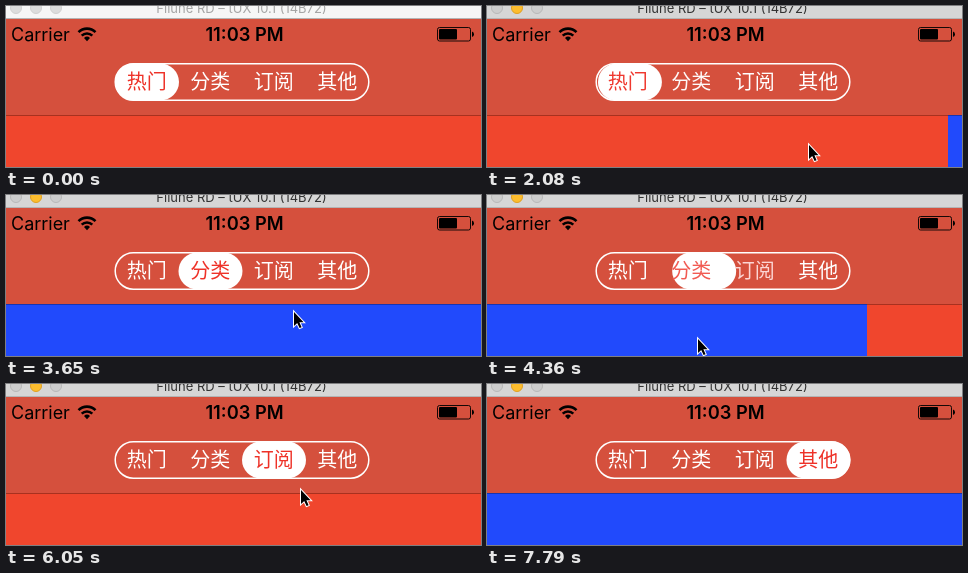
An HTML page that plays this animation: 475 px wide and 161 px high, repeating every 8 s.

```html
<!DOCTYPE html>
<html lang="zh-CN">
<head>
<meta charset="utf-8">
<style>
html, body { margin: 0; width: 100%; height: 100%; overflow: hidden; }
svg { display: block; width: 475px; height: 161px; }
text { font-family: Inter, Roboto, sans-serif; }
#tabs text { font: 20px "Noto Sans CJK SC", "Noto Sans CJK", sans-serif; text-anchor: middle; }
</style>
</head>
<body>
<svg viewBox="0 0 475 161">
  <g id="pages"></g>
  <rect y="12" width="475" height="97" fill="#d5503d"/>
  <rect y="109" width="475" height="1" fill="#000" opacity=".3"/>

  <rect id="bar" width="475" height="12"/>
  <rect y="12" width="475" height="1" fill="#b4b4b4"/>
  <g id="lights"></g>
  <text id="title" x="235.5" y="7" font-size="13" text-anchor="middle">Filune RD – tUX 10.1 (14B72)</text>

  <text x="5" y="35" font-size="18">Carrier</text>
  <text x="238.5" y="35" font-size="18.3" font-weight="600" text-anchor="middle">11:03 PM</text>
  <g fill="none" stroke="#000" stroke-width="2.6">
    <path d="M72.5 26.2a12 12 0 0 1 17 0M75.7 29.6a7.6 7.6 0 0 1 10.6 0"/>
    <path d="M81 35.2l-3-3.2a4.4 4.4 0 0 1 6 0z" fill="#000" stroke="none"/>
  </g>
  <rect x="431.5" y="21.5" width="33" height="13.5" rx="2" fill="none" stroke="#000" stroke-opacity=".9"/>
  <rect x="433" y="23" width="18" height="10.5" rx="1"/>
  <path d="M466 25.5q2 .6 2 2.7t-2 2.7z"/>

  <rect x="109.2" y="57.8" width="253.6" height="36.4" rx="18.2" fill="none" stroke="#fff" stroke-width="1.5"/>
  <rect id="pill" y="57.5" width="64" height="37" rx="18.5" fill="#fff"/>
  <g id="tabs"></g>

  <path id="cursor" d="M1 1V15L4.2 12L6.6 17L8.6 16.2L6.4 11.2H10.6Z" stroke="#fff" stroke-width="2" paint-order="stroke"/>
</svg>
<script>
const LOOP = 8000, WIDTH = 475, TAB = 63.5, LEFT = 109;
const RED = [240, 70, 45], BLUE = [33, 74, 252];
const WHITE = [255, 255, 255], INK = [238, 50, 40];
const $ = id => document.getElementById(id);
const rgb = c => `rgb(${c.map(Math.round)})`;
const mix = (a, b, u) => a.map((v, i) => v + (b[i] - v) * u);
const ramp = (t, a, b) => Math.min(1, Math.max(0, (t - a) / (b - a)));

function add(parent, tag, attrs, text = "") {
  const el = document.createElementNS("http://www.w3.org/2000/svg", tag);
  for (const k in attrs) el.setAttribute(k, attrs[k]);
  el.textContent = text;
  return parent.appendChild(el);
}

// The pointer glides to "from", drags the page to "to", then lets it snap
const swipes = [
  { glide: 540, press: 2032, stop: 2990, free: 3240, from: 335, to: 59, y: 138 },
  { glide: 3290, press: 4120, stop: 4695, free: 4940, from: 303, to: 80, y: 143 },
  { glide: 5760, press: 6790, stop: 7500, free: 7500, from: 344, to: 21, y: 123 }
];
// Finally it leaves the stage
swipes.push({ glide: 7560, press: LOOP, stop: LOOP + 1, free: LOOP, from: -60, to: -60, y: 123 });

function pose(t) {
  let x = 420, y = 146, page = 0;
  for (const s of swipes) {
    const u = ramp(t, s.glide, s.glide + 760);
    const ease = 1 - (1 - u) ** 2.3, arc = Math.sin(Math.PI * u);
    const drag = (s.from - s.to) * ramp(t, s.press, s.stop);
    const rest = Math.exp(-Math.max(0, t - s.free) / 50);
    x += (s.from - x) * ease + Math.sign(s.from - x) * 40 * arc - drag;
    y += (s.y - y) * ease - 26 * arc;
    page += 1 - (1 - drag / 468) * rest;
  }
  return { x, y, page };
}

[RED, BLUE, RED, BLUE].forEach((c, i) =>
  add($("pages"), "rect", { x: i * WIDTH, y: 109, width: WIDTH, height: 52, fill: rgb(c) }));
const labels = ["热门", "分类", "订阅", "其他"].map((s, i) =>
  add($("tabs"), "text", { x: LEFT + TAB * (i + .5), y: 83 }, s));
const lights = [10, 30, 50].map(cx => add($("lights"), "circle", { cx, cy: 2, r: 5.5 }));

function draw(now) {
  const t = now % LOOP, active = t >= 2030;
  const { x, y, page } = pose(t);

  $("pages").setAttribute("transform", `translate(${-Math.round(page * WIDTH)})`);
  $("pill").setAttribute("x", LEFT + page * TAB);
  labels.forEach((el, i) =>
    el.setAttribute("fill", rgb(mix(WHITE, INK, Math.max(0, 1 - Math.abs(page - i))))));

  $("bar").setAttribute("fill", active ? "#d6d6d6" : "#f6f6f6");
  $("title").setAttribute("fill", active ? "#333" : "#a5a5a5");
  lights.forEach((el, i) => {
    const on = active && i === 1;
    el.setAttribute("fill", on ? "#fdbd2e" : active ? "#cdcdcd" : "#dcdcdc");
    el.setAttribute("stroke", on ? "#dfa023" : active ? "#b8b8b8" : "#d0d0d0");
  });

  $("cursor").setAttribute("transform", `translate(${Math.round(x)} ${Math.round(y)})`);
  $("cursor").setAttribute("visibility", t < 305 ? "hidden" : "visible");
  requestAnimationFrame(() => draw(performance.now()));
}
draw(0);
</script>
</body>
</html>
```
